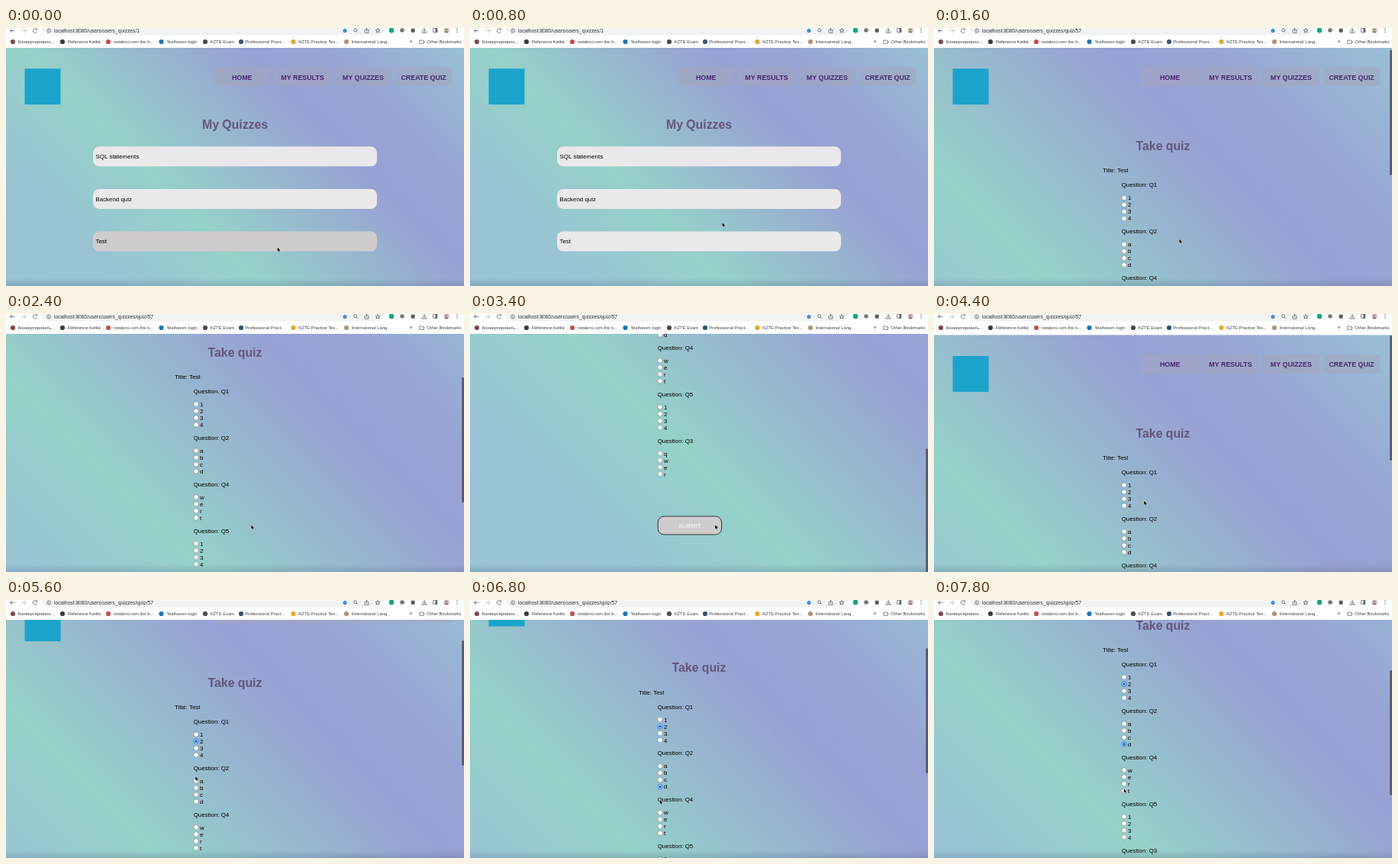
Animation, 600 px wide and 338 px high, one loop 8000 ms. Source, as an HTML page with a canvas:

```html
<!DOCTYPE html>
<html lang="en">
<head>
<meta charset="utf-8">
<title>Quiz app</title>
<style>
html, body { margin: 0; width: 100%; height: 100%; overflow: hidden; background: #fff; }
canvas { display: block; width: 600px; height: 338px; }
</style>
</head>
<body>
<canvas id="stage"></canvas>
<script>
const W = 600, H = 338, TOP = 26, LOOP = 8000, STEP = 200;
const OPEN_QUIZ = 1600, PICK_2 = 5000, PICK_D = 6600;
const FONT = '"Liberation Sans", Arial, sans-serif';
const canvas = document.getElementById('stage');
const ctx = canvas.getContext('2d');
const ratio = window.devicePixelRatio || 1;
canvas.width = W * ratio;
canvas.height = H * ratio;

// Keys are [time, ...values]; a negative scroll is the rebound at the top of the page
const cursorKeys = [[0, 355.7, 287.5], [200, 355, 286], [800, 330.6, 255], [1200, 321.5, 276.5],
  [3600, 321.2, 276.3], [4400, 275.2, 244.7], [5000, 248.3, 231.2], [5800, 248.3, 231.2],
  [6400, 248.7, 262], [7000, 248.7, 262], [7600, 248.7, 247]];
const scrollKeys = [[0, 0], [2000, 0], [2400, 104.4], [3200, 283.4], [3600, 283.4], [4400, -1.6],
  [4800, 0], [5200, 0], [5600, 46.4], [6600, 46.4], [7200, 121.4]];

const questions = [['Q1', '1234'], ['Q2', 'abcd'], ['Q4', 'wert'], ['Q5', '1234'], ['Q3', 'qwer']];
const bookmarks = [
  [9, '#7d4a4a', 'Конвертировать...'], [74, '#3c3c3c', 'Reference Kettle'],
  [134, '#c2504a', 'notabrix.com the b...'], [203.5, '#1f74b8', 'Tealhaven login'],
  [261, '#4a4a4a', 'KZTE Exam'], [308, '#36566e', 'Professional Pract...'],
  [376.5, '#e3a82b', 'KZTE Practice Tes...'], [446, '#b99273', 'International Lang...']];

function sample(keys, t) {
  const i = keys.findIndex(k => k[0] > t);
  if (i < 0) return keys[keys.length - 1].slice(1);
  const a = keys[i - 1], b = keys[i];
  const p = (t - a[0]) / (b[0] - a[0]);
  const eased = p * p * (3 - 2 * p);
  return a.slice(1).map((v, n) => v + (b[n + 1] - v) * eased);
}

function text(str, x, y, size, color = '#000', bold = false, align = 'left') {
  ctx.font = `${bold ? 'bold ' : ''}${size}px ${FONT}`;
  ctx.textAlign = align;
  ctx.fillStyle = color;
  ctx.fillText(str, x, y);
}

function box(x, y, w, h, fill, radius = 0, stroke) {
  ctx.beginPath();
  ctx.roundRect(x, y, w, h, radius);
  if (fill) { ctx.fillStyle = fill; ctx.fill(); }
  if (stroke) { ctx.strokeStyle = stroke; ctx.stroke(); }
}

function dot(x, y, r, fill, stroke) {
  box(x - r, y - r, 2 * r, 2 * r, fill, r, stroke);
}

function line(d, color = '#5f6368', x = 0, y = 0) {
  ctx.save();
  ctx.translate(x, y);
  ctx.strokeStyle = color;
  ctx.stroke(new Path2D(d));
  ctx.restore();
}

function background(height) {
  const half = (W + height) / 4, cy = TOP + height / 2;
  const g = ctx.createLinearGradient(W / 2 - half, cy + half, W / 2 + half, cy - half);
  g.addColorStop(0, '#98c3d6');
  g.addColorStop(0.18, '#98c4d4');
  g.addColorStop(0.37, '#95d2c8');
  g.addColorStop(0.68, '#98a1d4');
  g.addColorStop(0.78, '#98a3d4');
  g.addColorStop(1, '#99bfd6');
  box(0, TOP, W, height, g);
}

function header() {
  box(24.5, 53.3, 47, 47, '#1ba3cb');
  ['HOME', 'MY RESULTS', 'MY QUIZZES', 'CREATE QUIZ'].forEach((label, i) => {
    const x = 272 + i * 79.3;
    box(x, 51.3, 74.4, 25, 'rgba(165,165,187,.5)', 1);
    text(label, x + 37.2, 67.5, 8.85, '#46286e', true, 'center');
  });
}

function heading(str, y) {
  text(str, 300, y, 15.8, '#65557c', true, 'center');
}

function listPage([cx, cy]) {
  background(H - TOP);
  header();
  heading('My Quizzes', 131.6);
  ['SQL statements', 'Backend quiz', 'Test'].forEach((label, i) => {
    const y = 155.3 + i * 55.6;
    const hover = cx > 114 && cx < 486 && cy > y && cy < y + 26;
    box(114, y, 372, 26, hover ? '#d0ccce' : '#eae8ea', 8);
    text(label, 117.5, y + 15.8, 7.9);
  });
}

function radio(x, y, checked) {
  ctx.lineWidth = checked ? 0.9 : 0.55;
  dot(x, y, 3.1, '#fff', checked ? '#0b6fe0' : '#767676');
  if (checked) dot(x, y, 1.9, '#0b6fe0');
}

function quizPage(t, scroll) {
  ctx.save();
  ctx.translate(0, -scroll);
  background(595.4);
  header();
  heading('Take quiz', 160.2);
  text('Title: Test', 221, 189.4, 7.9);
  questions.forEach(([name, options], q) => {
    const y = 205.6 + q * 60.9;
    text('Question: ' + name, 245.7, y + 2.8, 7.9);
    [...options].forEach((label, i) => {
      const oy = y + 16.9 + i * 9;
      const checked = (q === 0 && i === 1 && t >= PICK_2) || (q === 1 && i === 3 && t >= PICK_D);
      radio(249, oy, checked);
      text(label, 254, oy + 2.9, 7.9);
    });
  });
  ctx.lineWidth = 0.9;
  box(246.2, 548.4, 83.4, 24, '#cfcbce', 8, '#222');
  text('SUBMIT', 288, 563.1, 7.9, '#fff', false, 'center');
  ctx.restore();
  box(597.2, 28.8 + scroll * 0.52, 2.8, 164, '#565a70', 1.4);
}

function bottomShade() {
  const g = ctx.createLinearGradient(0, 328, 0, H);
  g.addColorStop(0, 'rgba(80,95,125,0)');
  g.addColorStop(1, 'rgba(80,95,125,.25)');
  box(0, 328, W, H - 328, g);
}

function toolbar(url) {
  box(0, 0, W, TOP, '#fff');
  box(47, -6, 448, 15.5, '#f1f3f4', 7.7);
  ctx.lineWidth = 0.8;
  line('M3 0H-3M-.3-2.7L-3 0L-.3 2.7', '#5f6368', 8.5, 3.5);
  line('M-3 0H3M.3-2.7L3 0L.3 2.7', '#b4b7ba', 23.5, 3.5);
  line('M2.2-1.6A2.7 2.7 0 1 0 2.6.8M2.6-3V-1.2H.8', '#5f6368', 38, 3.5);
  dot(56, 3.5, 2.5, null, '#5f6368');
  line('M0-.4V1.5M0-1.5V-1', '#5f6368', 56, 3.5);
  text(url, 63, 6, 6.72, '#303134');

  dot(444, 3.5, 2.6, '#4b86e0');
  dot(457.6, 2.8, 2, null, '#5f6368');
  line('M1.4 1.4L3 3', '#5f6368', 457.6, 2.8);
  line('M-1.3-.8H-2.4V3H2.4V-.8H1.3M0 1.3V-3M-1.3-1.8L0-3L1.3-1.8', '#5f6368', 472.5, 3.3);
  line('M0-3L.9-1H3L1.3.4L1.9 2.6L0 1.3L-1.9 2.6L-1.3.4L-3-1H-.9Z', '#5f6368', 487, 3.5);
  dot(505, 3, 3.4, '#14a683');
  dot(519, 3, 2.8, '#777');
  box(530.6, 0.7, 5, 5, '#565a5f', 1);
  line('M0-3V1M-1.8-.7L0 1.2L1.8-.7M-2.8 1.2V3H2.8V1.2', '#45484c', 548, 3);
  box(559.5, 0.3, 5.4, 5.4, null, 0.7, '#5f6368');
  box(562.5, 0.3, 2.4, 5.4, '#5f6368');
  dot(577, 3, 4, '#dccbc5');
  dot(577, 2, 1.4, '#9a7d75');
  box(574.8, 3.7, 4.4, 2.6, '#9a7d75', 1.2);
  [0.6, 3, 5.4].forEach(y => dot(591, y, 0.65, '#5f6368'));

  bookmarks.forEach(([x, color, label]) => {
    dot(x, 18, 3.1, color);
    text(label, x + (x === 308 ? 5.2 : 6.7), 20.1, 5.8, '#3c4043');
  });
  text('»', 528.5, 20, 7, '#3c4043');
  line('M-2.8-2H-.6L.2-1.2H2.8V2.2H-2.8Z', '#5f6368', 544.7, 18);
  text('Other Bookmarks', 551.3, 20.1, 5.8, '#3c4043');
}

function pointer([x, y]) {
  ctx.save();
  ctx.translate(x, y);
  const shape = new Path2D('M0 0V5.2L1.2 4.1L2 6L2.9 5.6L2.1 3.8H3.7Z');
  ctx.lineWidth = 0.7;
  ctx.strokeStyle = '#fff';
  ctx.stroke(shape);
  ctx.fillStyle = '#000';
  ctx.fill(shape);
  ctx.restore();
}

function draw(now) {
  const t = Math.floor((now % LOOP) / STEP) * STEP;
  const cursor = sample(cursorKeys, t);
  const onQuiz = t >= OPEN_QUIZ;
  ctx.setTransform(ratio, 0, 0, ratio, 0, 0);
  box(0, 0, W, H, '#fff');
  if (onQuiz) quizPage(t, sample(scrollKeys, t)[0]);
  else listPage(cursor);
  bottomShade();
  toolbar('localhost:8080/users/users_quizzes/' + (onQuiz ? 'quiz/57' : '1'));
  pointer(cursor);
}

const start = performance.now();
function tick() {
  draw(performance.now() - start);
  requestAnimationFrame(tick);
}
tick();
</script>
</body>
</html>
```
